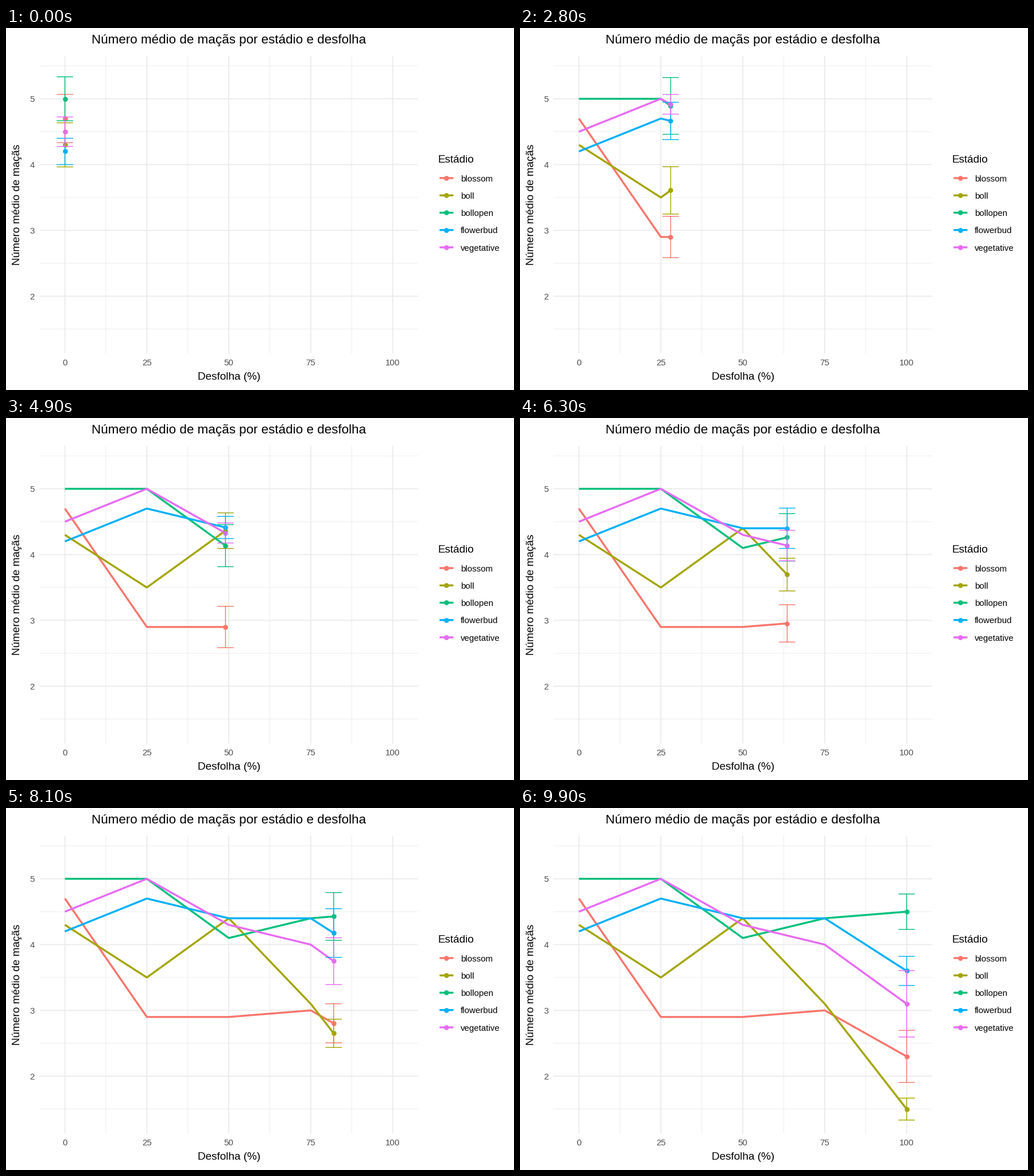
A matplotlib script that plays this animation: 885x632 px, repeating every 10000 ms.

```python
import numpy as np
import matplotlib.pyplot as plt
from matplotlib.animation import FuncAnimation

W, H, DPI = 885, 632, 64
PT = 72 / DPI  # points per pixel
plt.rcParams["font.family"] = "Liberation Sans"

FRAMES = 100
KEY_FRAMES = [0, 25, 50, 74, 99]
DOSE = np.array([0, 25, 50, 75, 100])

# name: colour, means, sums of squared deviations (ten samples each)
SERIES = {
    "blossom": ("#F8766D", [4.7, 2.9, 2.9, 3.0, 2.3], [12.1, 8.9, 8.9, 6, 14.1]),
    "boll": ("#A3A500", [4.3, 3.5, 4.4, 3.1, 1.5], [10.1, 12.5, 6.4, 4.9, 2.5]),
    "bollopen": ("#00BF7D", [5.0, 5.0, 4.1, 4.4, 4.5], [10, 18, 8.9, 14.4, 6.5]),
    "flowerbud": ("#00B0F6", [4.2, 4.7, 4.4, 4.4, 3.6], [3.6, 8.1, 2.4, 16.4, 4.4]),
    "vegetative": ("#E76BF3", [4.5, 5.0, 4.3, 4.0, 3.1], [4.5, 2, 2.1, 8, 22.9]),
}

LEFT, RIGHT, TOP, BOTTOM = 58.5, 717.8, 48.4, 568.2
LINE_W, BAR_W, DOT = 3.4, 1.42, 8.6
CAP = 2.5  # half width of an error bar, in x units


def px(x):
    return 102.6 + 5.71 * np.asarray(x, float)


def py(y):
    return 123.6 + 114.87 * (5 - np.asarray(y, float))


fig = plt.figure(figsize=(W / DPI, H / DPI), dpi=DPI, facecolor="white")
ax = fig.add_axes([0, 0, 1, 1])
ax.set(xlim=(0, W), ylim=(H, 0))
ax.axis("off")


def stroke(xs, ys, color, width, z):
    return ax.plot(xs, ys, color=color, lw=width * PT, zorder=z, snap=False,
                   solid_capstyle="butt", solid_joinstyle="round")[0]


def dot(xs, ys, color, z):
    return ax.plot(xs, ys, "o", color=color, ms=DOT * PT, mew=0, zorder=z)[0]


def label(x, y, s, size, color="black", **kw):
    ax.text(x, y, s, fontsize=size * PT, color=color, **kw)


def grid(xs, ys, width, z):
    for x in px(xs):
        stroke([x, x], [TOP, BOTTOM], "#EBEBEB", width, z)
    for y in py(ys):
        stroke([LEFT, RIGHT], [y, y], "#EBEBEB", width, z)


grid(DOSE[:-1] + 12.5, np.arange(1.5, 6), 0.9, 0)
grid(DOSE, np.arange(2, 6), 1.8, 1)

MID = (LEFT + RIGHT) / 2
label(MID + 0.3, 27, "Número médio de maçãs por estádio e desfolha", 22.4, ha="center")
label(MID + 0.3, 614, "Desfolha (%)", 19, ha="center")
label(24.5, 308.7, "Número médio de maçãs", 19, rotation=90,
      ha="right", va="center", rotation_mode="default") if False else \
    label(24.5, 308.7, "Número médio de maçãs", 19, rotation=90,
          ha="center", va="baseline", rotation_mode="anchor")
for d in DOSE:
    label(px(d), 589, str(d), 15, "#4D4D4D", ha="center")
for v in range(2, 6):
    label(49.5, py(v) + 5.7, str(v), 15, "#4D4D4D", ha="right")

label(752, 235, "Estádio", 19)
for i, (name, (color, _, _)) in enumerate(SERIES.items()):
    y = 262 + 30.24 * i
    stroke([755.3, 779.5], [y, y], color, LINE_W, 2)
    dot([767.4], [y], color, 3)
    label(792, y + 5.7, name, 15)

tracks = []
for color, mean, ss in SERIES.values():
    tracks.append((np.array(mean), np.sqrt(np.array(ss) / 90),
                   stroke([], [], color, LINE_W, 2),
                   dot([], [], color, 3),
                   stroke([], [], color, BAR_W, 4)))


def update(k):
    x = np.interp(k, KEY_FRAMES, DOSE)
    past = DOSE < x
    xs = px(np.append(DOSE[past], x))
    gap = np.nan
    bar_x = px([x - CAP, x + CAP, gap, x, x, gap, x - CAP, x + CAP])
    artists = []
    for mean, err, line, point, bar in tracks:
        m, e = np.interp(x, DOSE, mean), np.interp(x, DOSE, err)
        hi, lo = m + e, m - e
        line.set_data(xs, py(np.append(mean[past], m)))
        point.set_data([px(x)], [py(m)])
        bar.set_data(bar_x, py([hi, hi, gap, hi, lo, gap, lo, lo]))
        artists += [line, point, bar]
    return artists


anim = FuncAnimation(fig, update, frames=FRAMES, interval=100,
                     repeat=True, repeat_delay=0, blit=False)
plt.show()
```
